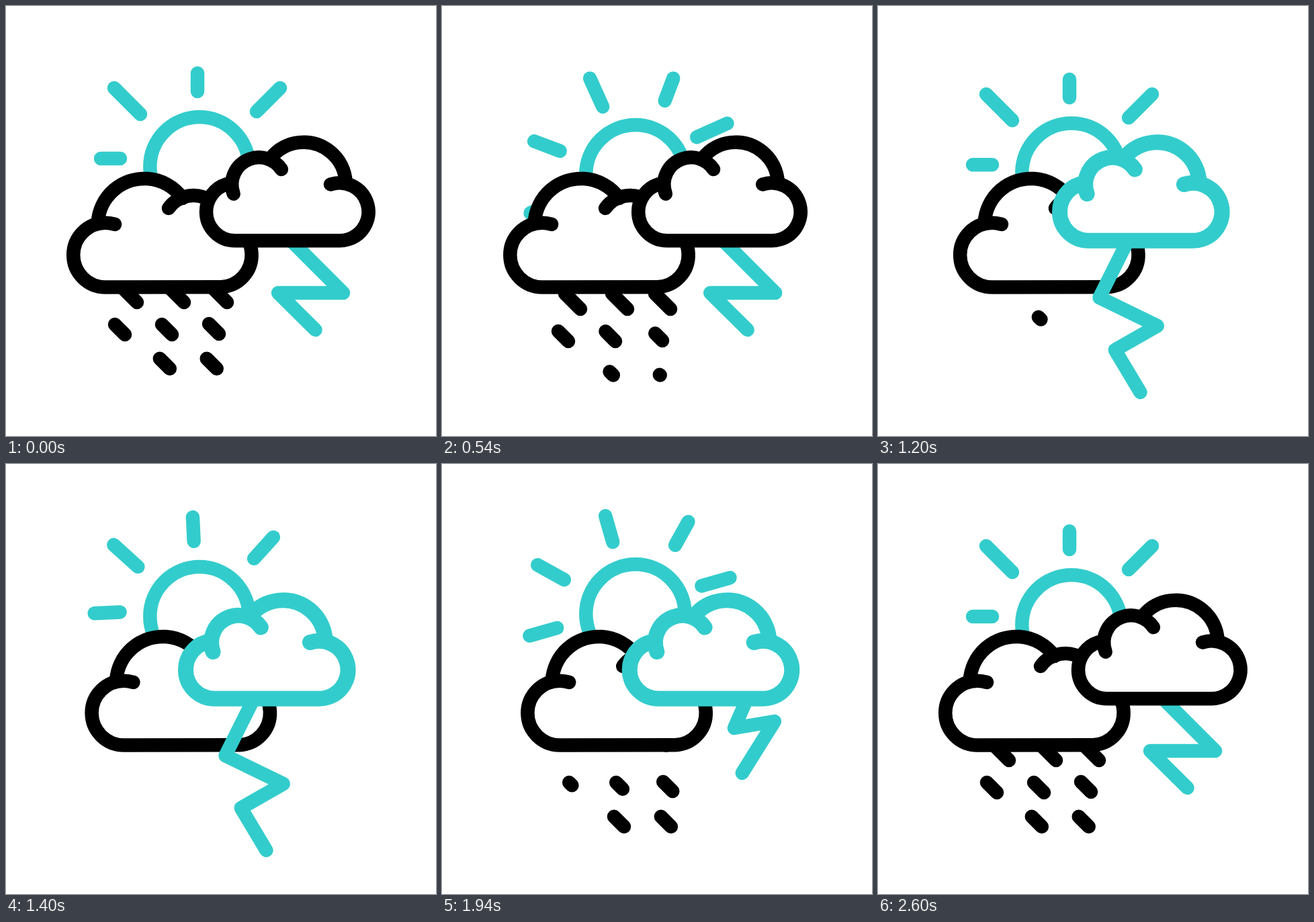
Write an HTML page with a canvas that moves like this. It is 640 px wide and 640 px high and loops after 3 s.

```html
<!DOCTYPE html>
<html lang="en">
<head>
<meta charset="utf-8">
<title>Weather</title>
<style>
  html, body { margin: 0; width: 100%; height: 100%; overflow: hidden; background: #fff; }
  canvas { display: block; width: 640px; height: 640px; }
</style>
</head>
<body>
<canvas id="stage" width="640" height="640"></canvas>
<script>
const ctx = document.getElementById('stage').getContext('2d');
const LOOP = 3000, STEP = 20;
const TEAL = '#33cccc', INK = '#000', LINE = 20.5, BOLD = 23;

// Smooth 0..1 between times a and b
function ease(t, a, b) {
  const u = Math.min(1, Math.max(0, (t - a) / (b - a)));
  return u * u * (3 - 2 * u);
}
const pulse = (t, a, mid, b) => ease(t, a, mid) - ease(t, mid, b);

function pen(color, width) {
  ctx.strokeStyle = color;
  ctx.lineWidth = width;
}

function line(...pts) {
  ctx.beginPath();
  for (const [x, y] of pts) ctx.lineTo(x, y);
  ctx.stroke();
}

function at(x, y, draw) {
  ctx.save();
  ctx.translate(x, y);
  draw();
  ctx.restore();
}

// Rays around the sun's centre: inner end, outer end, change of length
const rays = [
  { from: [-118, -12], to: [-147, -12], grow: 23.5 },
  { from: [-88, -78], to: [-127, -117], grow: -17 },
  { from: [-3, -112], to: [-3, -139], grow: 23.5 },
  { from: [85, -82], to: [120, -117], grow: -17 },
  { from: [106, -13], to: [136.5, -13], grow: 23.5 }
];

function drawSun(t) {
  const y = 239 + 25.5 * ease(t, 200, 920) - 50.1 * ease(t, 940, 1620) + 24.6 * ease(t, 1620, 2420);
  const turn = -34.4 * pulse(t, 200, 730, 1200) - 16 * pulse(t, 1200, 1960, 2400);
  const stretch = 1.08 * (pulse(t, 200, 700, 1200) + pulse(t, 1200, 1700, 2200));
  pen(TEAL, LINE);
  at(288, y, () => {
    ctx.beginPath();
    ctx.arc(0, 0, 73.7, 0, 7);
    ctx.stroke();
    ctx.rotate(turn * Math.PI / 180);
    for (const { from, to, grow } of rays) {
      const dx = to[0] - from[0], dy = to[1] - from[1];
      const k = 1 + grow * stretch / Math.hypot(dx, dy);
      line(from, [from[0] + dx * k, from[1] + dy * k]);
    }
  });
}

// Drops in the order they leave: x, y of the tail and the diagonal run
const drops = [
  [298.7, 524.7, 15], [228.8, 524.7, 15],
  [302, 473, 15], [232, 474, 15], [162, 474, 15],
  [306, 418, 23], [242, 418, 23], [172, 418, 23]
];

function drawRain(t) {
  const fall = 25.5 * ease(t, 200, 1000);
  pen(INK, LINE);
  drops.forEach(([x, y, run], i) => {
    const out = 200 + 100 * i, back = 1400 + 100 * i;
    const leaving = t < out + 400;
    if (!leaving && t <= back) return;
    const shift = leaving ? fall : 0;
    const tail = shift + (leaving ? run * ease(t, out, out + 400) : 0);
    const head = shift + (leaving ? run : run * ease(t, back, back + 400));
    line([x + tail, y + tail], [x + head, y + head]);
  });
}

// Circle arc from the direction of point p, clockwise to that of point q
function arc([cx, cy, r], p, q) {
  ctx.arc(cx, cy, r, Math.atan2(p[1] - cy, p[0] - cx), Math.atan2(q[1] - cy, q[0] - cx));
}

const rearCloud = {
  left: [148, 370.6, 47.8],
  right: [318, 370.6, 47.6],
  bumps: [[206, 326.3, 69.4], [279, 327.5, 45.5]],
  leftEnd: [162, 325], rightEnd: [316, 323],
  spans: [[[137, 322], [262, 286.5]], [[242, 301], [322, 314]]]
};
const frontCloud = {
  left: [341, 306.3, 43],
  right: [496.5, 306.3, 43],
  bumps: [[376.5, 265.7, 40.3], [443, 265.6, 62.8]],
  leftEnd: [328, 265.3], rightEnd: [483, 265.4],
  spans: [[[337.5, 280], [410, 243]], [[394, 226], [505.6, 263]]]
};

function drawCloud(c, color, width) {
  const [lx, ly, r] = c.left, [rx, ry] = c.right;
  ctx.fillStyle = '#fff';
  for (const [x, y, rad] of [c.left, c.right, ...c.bumps]) {
    ctx.beginPath();
    ctx.arc(x, y, rad, 0, 7);
    ctx.fill();
  }
  ctx.fillRect(lx, ly - r, rx - lx, 2 * r);

  pen(color, width);
  ctx.beginPath();
  arc(c.right, c.rightEnd, [rx, ry + r]);
  arc(c.left, [lx, ly + r], c.leftEnd);
  ctx.stroke();
  c.bumps.forEach((b, i) => {
    ctx.beginPath();
    arc(b, ...c.spans[i]);
    ctx.stroke();
  });
}

const bolts = [
  [[424, 349], [502, 427], [405, 427], [460.5, 482]],
  [[399.5, 349], [357, 434], [443.3, 476], [380.3, 512], [418, 575]],
  [[473, 349], [453.7, 393], [513.7, 383], [465.5, 460]]
];

function boltIndex(t) {
  if (t < 640 || t >= 2020) return 0;
  return t < 1420 ? 1 : 2;
}

function draw(t) {
  const rearX = 29.6 * (ease(t, 400, 1600) - ease(t, 1800, 2600));
  const frontX = -30.7 * (ease(t, 190, 1450) - ease(t, 1600, 2400));
  const bolt = boltIndex(t);

  ctx.fillStyle = '#fff';
  ctx.fillRect(0, 0, 640, 640);
  ctx.lineCap = ctx.lineJoin = 'round';

  drawSun(t);
  at(rearX, 0, () => {
    drawRain(t);
    drawCloud(rearCloud, INK, LINE);
  });
  at(frontX, 0, () => {
    pen(TEAL, LINE);
    line(...bolts[bolt]);
    drawCloud(frontCloud, bolt ? TEAL : INK, bolt ? BOLD : LINE);
  });
}

function frame(now) {
  draw(Math.floor(now % LOOP / STEP) * STEP);
  requestAnimationFrame(frame);
}
draw(0);
requestAnimationFrame(frame);
</script>
</body>
</html>
```
